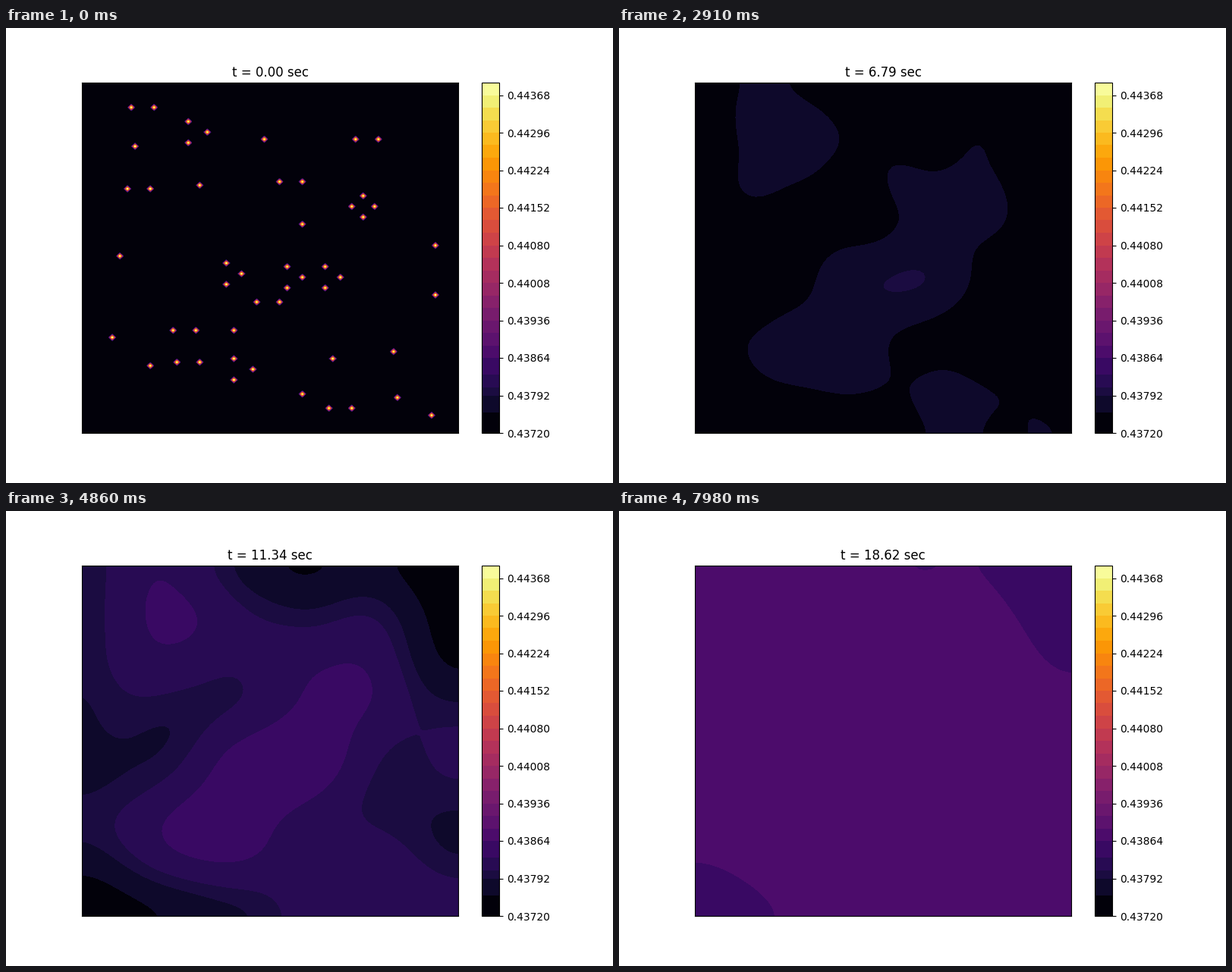
These frames come from a looping animation (800 px wide and 600 px high, 8 s). A matplotlib script:

```python
import numpy as np
import matplotlib
import matplotlib.pyplot as plt
from matplotlib.animation import FuncAnimation

N = 100                    # grid nodes per side
FRAMES, LOOP_MS = 267, 8000
DT, SUB = 0.07, 4          # time per frame, steps per frame
D, RATE, CAP = 4.2, 0.39, 20.0
BASE, UNIT = 0.4372, 8e-5  # lowest level and height of one colour step
TOP = 84                   # colour steps in all
PEAK, OFFSET = 83.5, 0.05
RING = 3                   # radius of a group of seeds, in nodes

# Group size -> centres as (column, row from the top).
GROUPS = {
    1: [(48, 16), (31, 29), (58, 40), (10, 49), (40, 70), (8, 72), (66, 78),
        (82, 76), (58, 88), (83, 89), (92, 94), (93, 46), (93, 60), (14, 18),
        (18, 80)],
    2: [(16, 7), (75, 16), (55, 28), (49, 62), (27, 70), (68, 92), (15, 30),
        (28, 79)],
    3: [(30, 14), (39, 54), (55, 55), (65, 55), (42, 81)],
    4: [(74, 35)],
}

# Fine at the dark end, then one colour for every three steps.
STEPS = np.r_[0, 5, 9, 11, 14, np.arange(18, TOP + 1, 3)]
LEVELS = BASE + UNIT * STEPS
inferno = matplotlib.colormaps["inferno"]
COLORS = inferno((STEPS[:-1] + 0.4 * (np.diff(STEPS) - 1)) / (TOP - 1))


def seed_field():
    """Single bright nodes, each group spread evenly on a ring."""
    v = np.zeros((N, N))
    for size, centres in GROUPS.items():
        turn = 2 * np.pi * np.arange(size) / size
        radius = RING if size > 1 else 0
        for col, row in centres:
            cols = np.rint(col + radius * np.cos(turn)).astype(int)
            rows = np.rint(row + radius * np.sin(turn)).astype(int)
            v[rows, cols] = PEAK
    return v


def diffusion_matrix(h):
    """Exact 1D heat step with closed ends."""
    lap = np.diag(np.full(N, -2.0))
    lap += np.diag(np.ones(N - 1), 1) + np.diag(np.ones(N - 1), -1)
    lap[0, 0] = lap[-1, -1] = -1
    w, q = np.linalg.eigh(lap)
    return (q * np.exp(D * h * w)) @ q.T


def simulate():
    """Diffusion with logistic growth, one field per frame."""
    h = DT / SUB
    heat, grow = diffusion_matrix(h), np.exp(RATE * h)
    v = seed_field()
    fields = [v]
    for _ in range(FRAMES - 1):
        for _ in range(SUB):
            v = heat @ v @ heat
            v = v * grow / (1 + v * (grow - 1) / CAP)
        fields.append(v)
    return [BASE + UNIT * (OFFSET + f) for f in fields]


fields = simulate()

fig, ax = plt.subplots(figsize=(8, 6), dpi=100)


def fill(i):
    return ax.contourf(fields[i], levels=LEVELS, colors=COLORS)


shown = [fill(0)]
bar = fig.colorbar(shown[0], ax=ax, spacing="proportional", format="%.5f",
                   ticks=BASE + UNIT * np.arange(0, TOP, 9))
bar.minorticks_off()
ax.set_xticks([])
ax.set_yticks([])
ax.set_xlim(0, N - 1)
ax.set_ylim(N - 1, 0)
title = ax.set_title("t = 0.00 sec")


def update(i):
    shown[0].remove()
    shown[0] = fill(i)
    title.set_text(f"t = {i * DT:.2f} sec")
    return shown[0], title


def init():
    return update(0)


anim = FuncAnimation(fig, update, frames=FRAMES, init_func=init,
                     interval=LOOP_MS / FRAMES, repeat=True, repeat_delay=0,
                     blit=False)
plt.show()
```
